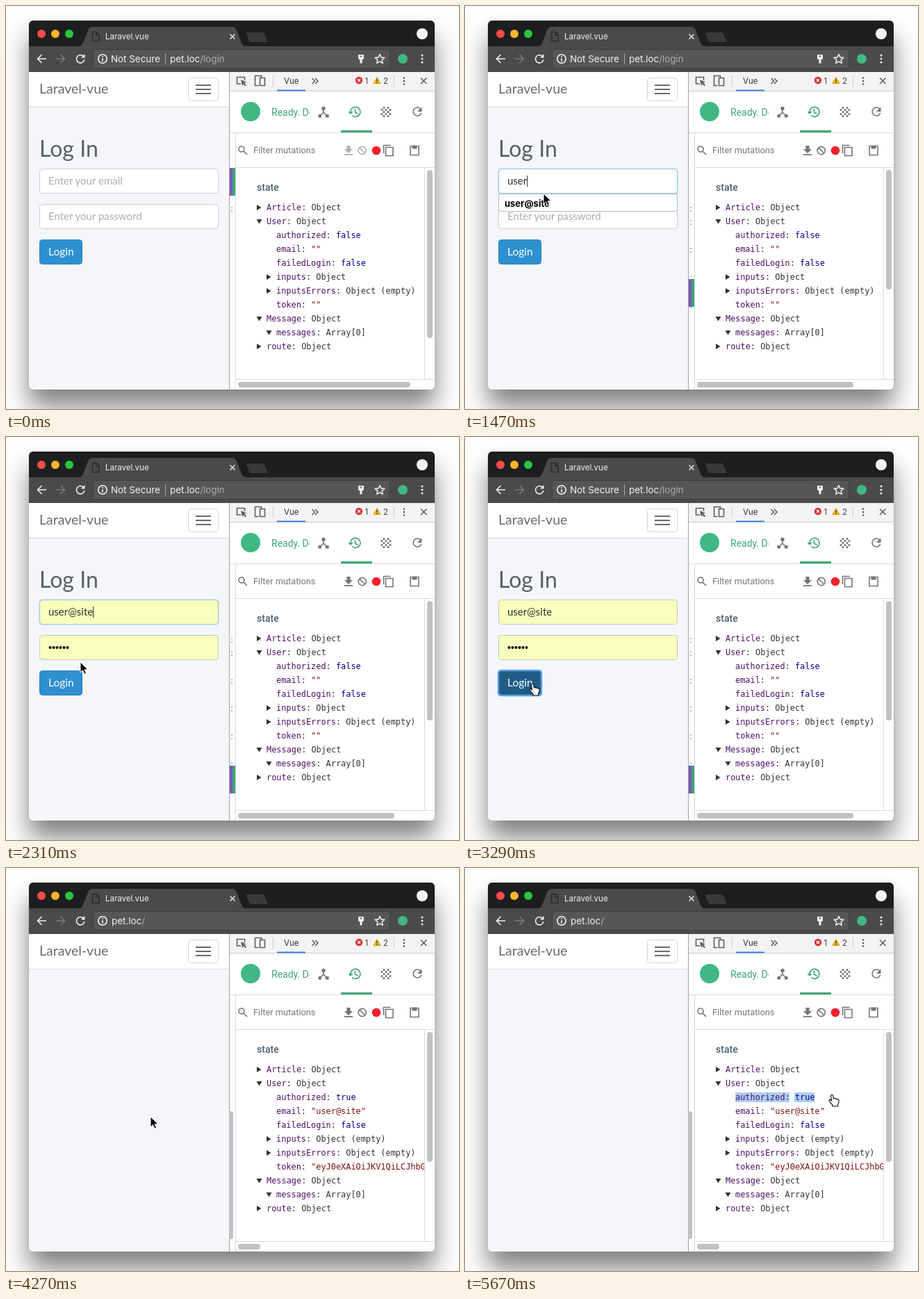
These frames come from a looping animation (652x580 px, 5950 ms). An HTML page:

```html
<!DOCTYPE html>
<html lang="en">
<head>
<meta charset="utf-8">
<title>Login and state inspector</title>
<style>
html, body { margin: 0; width: 100%; height: 100%; overflow: hidden; background: #fff; }
.shadow { position: absolute; left: 33px; top: 21px; width: 584px; height: 531px; border-radius: 6px;
  box-shadow: 0 24px 36px rgba(0,0,0,.5), 0 0 1px rgba(0,0,0,.4); }
svg { position: absolute; left: 0; top: 0; width: 652px; height: 580px; }
text { white-space: pre; }
.ui { font-family: Inter, sans-serif; }
.page { font-family: Lato, sans-serif; font-size: 15px; }
.tool { font-family: Roboto, sans-serif; }
.mono { font: 11.9px "DejaVu Sans Mono", monospace; fill: #333; }
.key { fill: #4d0f62; }
.bool { fill: #03038c; }
.str { fill: #7a1212; }
.line { fill: none; stroke: currentColor; stroke-width: 1.6; }
.hint { fill: #a9afb3; }
.bar { fill: #c1c1c1; }
</style>
</head>
<body>
<div class="shadow"></div>
<svg viewBox="0 0 652 580">
<defs>
  <clipPath id="win"><rect x="33" y="21" width="584" height="531" rx="6"/></clipPath>
  <clipPath id="status"><rect x="380" y="135" width="57" height="36"/></clipPath>
  <clipPath id="pane"><rect x="331" y="233" width="271" height="304"/></clipPath>
</defs>
<g clip-path="url(#win)">
  <!-- browser chrome -->
  <g class="ui">
    <path fill="#1c1e20" d="M33 21h584v38H33z"/>
    <path fill="#4a4a4a" d="M33 58h72q4 0 6-5l7-18q2-5 7-5h200q5 0 7 5l7 18q2 5 6 5h272v37H33z"/>
    <circle cx="51" cy="40" r="6" fill="#fc4a47"/>
    <circle cx="71" cy="40" r="6" fill="#fdb32a"/>
    <circle cx="91" cy="40" r="6" fill="#28c63f"/>
    <path class="line" color="#2a2c2d" d="M124.500 37.500h6l3.500 3.500v9.500h-9.500zM130 38v4h4"/>
    <text x="143" y="48" font-size="11.5" fill="#f2f2f2">Laravel.vue</text>
    <path class="line" color="#ddd" d="M322.500 40.500l7 7m0-7l-7 7"/>
    <path fill="#37393a" d="M347 38h22q2 0 3 2l4 10q1 2-1 2h-22q-2 0-3-2l-4-10q-1-2 1-2z"/>
    <circle cx="599" cy="40" r="8" fill="#f4f4f4"/>
    <path class="line" color="#f2f2f2" stroke-width="2" d="M58 76H45.500m6-6l-6 6 6 6"/>
    <path class="line" color="#7b7b7b" d="M72 76h12.500m-6-6l6 6-6 6"/>
    <path class="line" color="#f2f2f2" d="M111.500 72.500a5.700 5.700 0 1 0 1.300 4.500"/>
    <path fill="#f2f2f2" d="M113.500 69v5.500H108z"/>
    <rect x="125.500" y="62.500" width="427" height="27" rx="3" fill="#565656" stroke="#3c3c3c"/>
    <circle class="line" color="#f2f2f2" cx="139" cy="76" r="6.200"/>
    <path class="line" color="#f2f2f2" d="M139 72v1.700m0 1.500v4.500"/>
    <g font-size="13.400" fill="#f2f2f2">
      <g data-on="0-3500">
        <text x="151" y="81">Not Secure</text>
        <path stroke="#aaa" d="M229.500 68v16"/>
        <text x="236" y="81">pet.loc<tspan fill="#adadad">/login</tspan></text>
      </g>
      <text data-on="3500-5950" x="152" y="81">pet.loc<tspan fill="#adadad">/</tspan></text>
    </g>
    <path fill="#f2f2f2" d="M507 70h8v6l-2.500 1.500v5h-3v-5L507 76z"/>
    <path fill="#565656" d="M510 71.500h2v2h-2z"/>
    <path class="line" color="#e8e8e8" stroke-linejoin="round" d="M538 69.500l2 4.400 4.800.5-3.600 3.200 1 4.700-4.200-2.400-4.200 2.400 1-4.700-3.600-3.200 4.800-.5z"/>
    <circle cx="571" cy="76" r="7" fill="#41b883"/>
    <path stroke="#eee" stroke-width="3" stroke-linecap="round" stroke-dasharray="0 5" d="M599 71v11"/>
  </g>

  <!-- web page -->
  <g class="page">
    <path fill="#f4f6fa" d="M33 95h288v457H33z"/>
    <path fill="#fff" d="M33 95h288v50H33z"/>
    <path stroke="#d5d9dd" d="M33 145.500h288"/>
    <text x="48" y="126" font-size="19.500" fill="#666b6e">Laravel-vue</text>
    <rect x="262.500" y="103.500" width="43" height="33" rx="4" fill="#fff" stroke="#d3d5d7"/>
    <path stroke="#6a6a6a" stroke-width="2" d="M273 114h22m-22 6h22m-22 6h22"/>
    <g data-on="0-3500">
      <text x="48" y="217" font-size="32" fill="#596066">Log In</text>
      <g fill="#fff" stroke="#ccd0d2">
        <rect x="48.500" y="234.500" width="257" height="35" rx="4"/>
        <rect x="48.500" y="285.500" width="257" height="35" rx="4"/>
      </g>
      <g data-on="1820-3500" fill="#faffbd" stroke="#c4cbc0">
        <rect x="48.500" y="234.500" width="257" height="35" rx="4"/>
        <rect x="48.500" y="285.500" width="257" height="35" rx="4"/>
        <path stroke="#000" stroke-width="4" stroke-linecap="round" stroke-dasharray="0 5" d="M63.500 303h26"/>
      </g>
      <g data-on="490-3220" fill="none">
        <rect x="48.500" y="234.500" width="257" height="35" rx="4" stroke="#98cbe8"/>
        <rect x="47.500" y="233.500" width="259" height="37" rx="5" stroke="#98cbe8" stroke-opacity=".3"/>
      </g>
      <text class="hint" data-on="0-910" x="61" y="257">Enter your email</text>
      <text class="hint" data-on="0-1820" x="61" y="308">Enter your password</text>
      <g id="typed"></g>
      <g data-on="910-1820">
        <rect x="48.500" y="270.500" width="257" height="25" fill="#fff" stroke="#aebcc8"/>
        <text class="ui" x="57" y="289" font-size="13" font-weight="700">user@site</text>
      </g>
      <rect x="48.500" y="336.500" width="61" height="35" rx="4" fill="#2f90d0" stroke="#2a82bd"/>
      <rect data-on="2590-3220" x="48.500" y="336.500" width="61" height="35" rx="4" fill="#2579a9" stroke="#20698f"/>
      <rect data-on="3220-3500" x="48" y="336" width="62" height="36" rx="4" fill="#1f5d85" stroke="#5b9fec" stroke-width="2.500"/>
      <text x="61" y="359" font-size="15.500" fill="#fff">Login</text>
    </g>
  </g>

  <!-- developer tools -->
  <path fill="#fff" d="M321 95h296v457H321z"/>
  <path fill="#f3f3f3" d="M321 95h296v27H321z"/>
  <g class="ui" font-size="11.500" fill="#444" color="#5f5f5f">
    <path stroke="#ccc" d="M322 122.500h295M384.500 100v16M558.500 100v16"/>
    <path class="line" stroke-width="1.300" d="M338 112h-5.500v-9.500h11V107M358.500 108v-7.500h9v3M365.500 103.500h7v11h-7zM358.500 107v7.500h5"/>
    <path fill="#5f5f5f" d="M338 106l8 3.500-3 1.200 3 3-1.500 1.500-3-3-1.300 3z"/>
    <text x="400" y="112" fill="#333">Vue</text>
    <path fill="#3b82e8" d="M390 120.500h41v2h-41z"/>
    <path class="line" d="M440.500 104l4 4-4 4m4.500-8l4 4-4 4"/>
    <circle cx="508" cy="107" r="5.200" fill="#d8322f"/>
    <path stroke="#fff" stroke-width="1.300" d="M506 105l4 4m0-4l-4 4"/>
    <text x="516.500" y="112">1</text>
    <path fill="#efb61c" stroke="#d9a00c" stroke-linejoin="round" d="M534 102.500l5 9h-10z"/>
    <path stroke="#453600" stroke-width="1.300" d="M534 105v3.500m0 1v1.400"/>
    <text x="543" y="112">2</text>
    <path stroke="#555" stroke-width="2.600" stroke-linecap="round" stroke-dasharray="0 4.500" d="M573 103.500v10"/>
    <path class="line" d="M597 103.500l8.500 8.500m0-8.500l-8.500 8.500"/>
  </g>
  <g class="tool" color="#757575">
    <circle cx="352" cy="152" r="14" fill="#41b883"/>
    <text x="382" y="158" font-size="14" fill="#3ba776" clip-path="url(#status)">Ready. Done</text>
    <path class="line" stroke-width="1.800" d="M457 148v5l-5 5m5-5l5 5"/>
    <path fill="#757575" d="M449.500 156h4.500v4.500h-4.500zM460 156h4.500v4.500H460z"/>
    <circle cx="457" cy="147.500" r="2.700" fill="#757575"/>
    <path class="line" color="#3ba776" stroke-width="1.800" d="M496 152.500a7 7 0 1 1 2.200 5M502.500 148v5l4 2.300"/>
    <path fill="#3ba776" d="M492.500 152h7l-3.500 4z"/>
    <path fill="#3ba776" d="M482 179h45v3h-45z"/>
    <g stroke="#757575" stroke-width="3.200" stroke-linecap="round" stroke-dasharray="0 6">
      <path d="M544 146.500h7M541 149.500h13M544 152.500h7M541 155.500h13M544 158.500h7"/>
    </g>
    <path class="line" stroke-width="1.800" d="M597 148.500a6 6 0 1 0 .8 5.500"/>
    <path fill="#757575" d="M598.500 145.500v6.500H592z"/>
    <path stroke="#d9d9d9" d="M322 182.500h295M330 232.500h287M330.500 183v369M602.500 233v304M331 537.500h286"/>
    <circle class="line" cx="339" cy="206" r="4"/>
    <path class="line" stroke-width="2" d="M342 209l5 5"/>
    <text x="356" y="212" font-size="12.800" fill="#777">Filter mutations</text>
    <g id="actions">
      <path fill="currentColor" d="M490.500 201h5v5h3.500l-6 6-6-6h3.500zM487 213h12v1.800h-12z"/>
      <path class="line" d="M508.800 204a5.600 5.600 0 1 1 0 8 5.600 5.600 0 0 1 0-8l8 8"/>
    </g>
    <circle cx="533" cy="208" r="6.300" fill="#fa1f2d"/>
    <path class="line" d="M543.500 212v-11.500h10M546.500 203.500h10.500v12h-10.500z"/>
    <path class="line" d="M582 201.500h12v13h-12z"/>
    <path fill="#757575" d="M584.500 201h2a2 2 0 0 1 3 0h2v4.500h-7z"/>
    <text x="361" y="266" font-size="14" font-weight="500" fill="#486070">state</text>
  </g>

  <!-- mutation list edge -->
  <g id="ticks" class="mono" font-size="10"></g>
  <g id="marker" data-on="0-3500">
    <path fill="#7e57b9" d="M322 233h4v40h-4z"/>
    <path fill="#3ba776" d="M326 233h4v40h-4z"/>
  </g>

  <!-- state tree -->
  <g id="mark" fill="#accef7">
    <path d="M389 323h78v14h-78zM474 323h29v14h-29z"/>
  </g>
  <g clip-path="url(#pane)"><g id="tree" class="mono"></g></g>
  <g id="bars" class="bar"></g>
  <path stroke="#a3a3a3" d="M321.500 95v457"/>
  <rect class="bar" data-on="3500-5950" x="321" y="350" width="6" height="184" rx="3"/>
</g>

<g id="cursor">
  <path data-on="70-420 1400-2590 3500-4690" stroke="#fff" d="M0 0v15l3.500-3.300 2.400 5.500 2.500-1.100-2.300-5.300h4.900z"/>
  <path data-on="420-910" fill="none" stroke="#222" stroke-width="1.300" d="M-3-7q3 0 3 2.500 0-2.500 3-2.500M0-5V5M-3 7q3 0 3-2.500 0 2.500 3 2.500M-2 2h4"/>
  <path data-on="2590-3500 4690-5950" fill="#fff" stroke="#111" stroke-width="1.200" stroke-linejoin="round"
    d="M-1.500 1q0-2 1.500-2t1.700 2l.8 4q1.500-1.500 2.800.3 1.700-1 2.600.7 2-.6 2.200 1.600.3 4-1.600 6v2.400H1v-2q-3-2.500-4.800-6-.6-2 1.300-1.700l2 1.700z"/>
</g>
</svg>

<script>
const LOOP = 5950, STEP = 70;
const LOGIN = 3500, FILL = 1820;
const KEYS = [910, 1050, 1190, 1330];
const EMAIL = 'user@site';
const $ = id => document.getElementById(id);

// points: [time, css properties, steps while heading to the next point]
function play(el, points) {
  const frames = points.map(([t, css, n]) =>
    ({ ...css, offset: t / LOOP, easing: n ? `steps(${n}, end)` : 'step-end' }));
  if (points.at(-1)[0] < LOOP) frames.push({ ...points.at(-1)[1], offset: 1 });
  el.animate(frames, { duration: LOOP, iterations: Infinity });
}

function glide(el, prop, points) {
  play(el, points.map(([t, v], i) => {
    const next = points[i + 1];
    return [t, { [prop]: v }, next && next[1] !== v ? Math.round((next[0] - t) / STEP) : 0];
  }));
}

function showDuring(el) {
  const points = [[0, { opacity: 0 }]];
  for (const span of el.dataset.on.split(' ')) {
    const [from, to] = span.split('-').map(Number);
    if (from) points.push([from, { opacity: 1 }]);
    else points[0][1] = { opacity: 1 };
    if (to < LOOP) points.push([to, { opacity: 0 }]);
  }
  play(el, points);
}

// typed email with its caret
const typed = $('typed');
function addTyped(text, on, caretOn = on) {
  typed.insertAdjacentHTML('beforeend',
    `<text data-on="${on}" x="61" y="257" fill="#333">${text}</text>`);
  const x = 61.5 + (text && typed.lastElementChild.getComputedTextLength());
  typed.insertAdjacentHTML('beforeend',
    `<path data-on="${caretOn}" stroke="#222" d="M${x} 244v16"/>`);
}
addTyped('', `490-${KEYS[0]}`);
KEYS.forEach((t, i) => addTyped(EMAIL.slice(0, i + 1), `${t}-${KEYS[i + 1] || FILL}`));
addTyped(EMAIL, `${FILL}-${LOGIN}`, `${FILL}-2320 2820-3220`);

// state tree: level, fold, key, value before login, value after login
const ROWS = [
  [0, '>', 'Article', 'Object'],
  [0, 'v', 'User', 'Object'],
  [1, '', 'authorized', 'false', 'true'],
  [1, '', 'email', '""', `"${EMAIL}"`],
  [1, '', 'failedLogin', 'false'],
  [1, '>', 'inputs', 'Object', 'Object (empty)'],
  [1, '>', 'inputsErrors', 'Object (empty)'],
  [1, '', 'token', '""', '"eyJ0eXAiOiJKV1QiLCJhbGci'],
  [0, 'v', 'Message', 'Object'],
  [1, 'v', 'messages', 'Array[0]'],
  [0, '>', 'route', 'Object'],
];
const kind = v => v[0] === '"' ? 'str' : /^(true|false)$/.test(v) ? 'bool' : '';
const FOLD = { '>': 'v8l6.500-4z', 'v': 'm-.5 1h8l-4 6.500z' };

$('tree').innerHTML = ROWS.map(([level, fold, key, before, after], i) => {
  const x = 375 + 14 * level, y = 294 + 20 * i;
  const line = (value, on) =>
    `<text data-on="${on}" x="${x}" y="${y}"><tspan class="key">${key}</tspan>: <tspan class="${kind(value)}">${value}</tspan></text>`;
  const arrow = fold && `<path fill="#333" d="M${x - 14} ${y - 8}${FOLD[fold]}"/>`;
  return arrow + (after ? line(before, `0-${LOGIN}`) + line(after, `${LOGIN}-${LOOP}`) : line(before, `0-${LOOP}`));
}).join('');

// scrollbars: span, vertical length, horizontal length
$('bars').innerHTML = [
  [`0-${KEYS[0]}`, 242, 248],
  [`${KEYS[0]}-${LOGIN}`, 172, 225],
  [`${LOGIN}-${LOOP}`, 187, 32],
].map(([on, v, h]) => `<g data-on="${on}">
  <rect x="606" y="236" width="8" height="${v}" rx="4"/>
  <rect x="334" y="541" width="${h}" height="8" rx="4"/></g>`).join('');

// each mutation adds a list row and moves the marker down
const mutations = [...KEYS, FILL];
const tick = (y, from) =>
  `<text data-on="${from}-${LOGIN}" x="321.500" y="${y + 3}" fill="#999">:</text>`;
$('ticks').innerHTML = tick(293, 0) + mutations.map((t, i) => tick(312 + 40 * i, t)).join('');

play($('marker'), [
  [0, { transform: 'none' }],
  ...KEYS.map((t, i) => [t, { transform: `translateY(${40 * (i + 1)}px)` }]),
  [FILL, { transform: 'translateY(240px)' }],
]);
play($('actions'), [[0, { color: '#b0b0b0' }], [KEYS[0], { color: '#757575' }]]);

glide($('mark'), 'clipPath', [
  [0, 'inset(0 100% 0 0)'], [4830, 'inset(0 100% 0 0)'], [5110, 'inset(0 0% 0 0)'],
]);

glide($('cursor'), 'transform', [
  [0, 526, 484], [70, 526, 484], [420, 118, 259], [1400, 118, 259], [1470, 113, 270],
  [1680, 108, 284], [1820, 108, 284], [2100, 107, 324], [2450, 107, 324], [2800, 97, 356],
  [3640, 97, 356], [4200, 208, 358], [4340, 208, 358], [4760, 386, 329], [4830, 386, 329],
  [5180, 528, 327],
].map(([t, x, y]) => [t, `translate(${x}px, ${y}px)`]));

document.querySelectorAll('[data-on]').forEach(showDuring);
</script>
</body>
</html>
```
